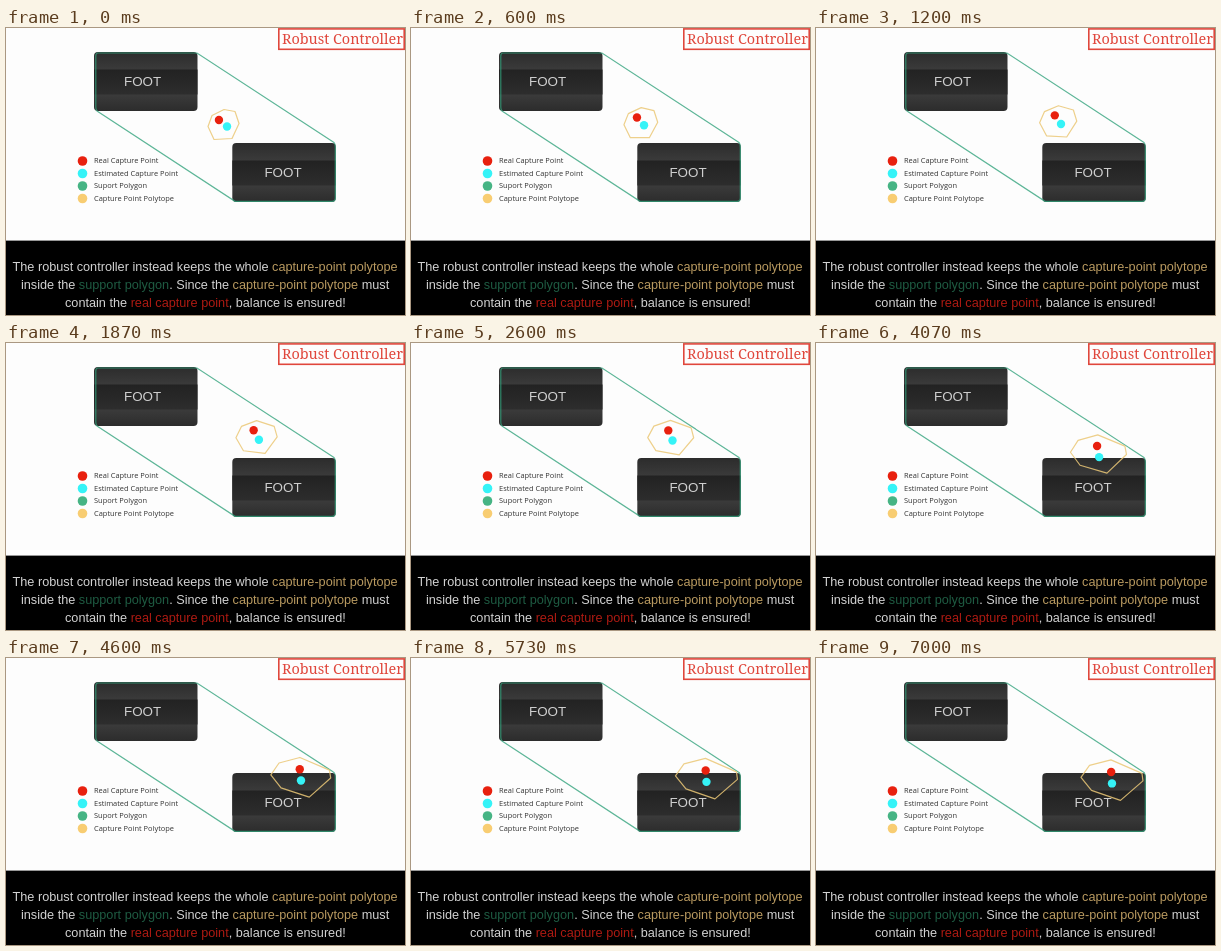
An HTML page that plays this animation: 399 by 287 pixels, repeating every 7070 ms.

```html
<!DOCTYPE html>
<html lang="en">
<head>
<meta charset="utf-8">
<title>Robust Controller</title>
<style>
  html, body { margin: 0; width: 100%; height: 100%; overflow: hidden; background: #fdfdfd; }
  svg { display: block; width: 100vw; height: 100vh; }
  .title { font: 500 14.4px "Noto Serif", serif; fill: #e0473c; }
  .foot { font: 13.4px "Liberation Sans", Arial, sans-serif; fill: #cfcfcf; }
  .legend { font: 7.45px "Open Sans", sans-serif; fill: #333; }
  .caption { font: 12.7px "Liberation Sans", Arial, sans-serif; fill: #d2d2d2; }
  .title, .foot, .caption { text-anchor: middle; }
  .tan { fill: #b99a60; }
  .green { fill: #1e5b42; }
  .red { fill: #ad1a12; }
</style>
</head>
<body>
<svg viewBox="0 0 399 287" preserveAspectRatio="none">
  <defs>
    <linearGradient id="edge" x2="0" y2="1">
      <stop offset="0" stop-color="#2c2c2c"/>
      <stop offset=".29" stop-color="#3a3a3a"/>
      <stop offset=".7" stop-color="#3c3c3c"/>
      <stop offset="1" stop-color="#2c2c2c"/>
    </linearGradient>
    <linearGradient id="band" x2="0" y2="1">
      <stop offset="0" stop-color="#222"/>
      <stop offset="1" stop-color="#2d2d2d"/>
    </linearGradient>
    <g id="shoe">
      <rect width="103.5" height="59" rx="4" fill="url(#edge)"/>
      <rect y="17.5" width="103.5" height="25" fill="url(#band)"/>
    </g>
  </defs>

  <rect width="399" height="287" fill="#fdfdfd"/>
  <rect x="272.8" y=".9" width="125.4" height="20.4" fill="none" stroke="#e0473c" stroke-width="1.6"/>
  <text class="title" x="336.5" y="16">Robust Controller</text>

  <use href="#shoe" x="88" y="24"/>
  <use href="#shoe" x="226.3" y="115"/>
  <path d="M92 25H191L328 114.4Q329.3 115.5 329.3 119V170Q329.3 173.3 326 173.3H229L91 83Q89.8 82 89.8 79V28Q89.8 25 92 25Z"
        fill="none" stroke="#31a27b" stroke-opacity=".78" stroke-width="1.2"/>
  <text class="foot" x="136.6" y="57.8">FOOT</text>
  <text class="foot" x="277" y="148.8">FOOT</text>
  <g id="legend" class="legend"></g>

  <path id="polytope" fill="none" stroke="#ebc877" stroke-opacity=".85" stroke-width="1.2" stroke-linejoin="round"/>
  <circle id="real" r="4.2" fill="#e8200e"/>
  <circle id="estimate" r="4.2" fill="#35f3f7"/>

  <rect y="212.6" width="399" height="75" fill="#000"/>
  <g class="caption">
    <text x="199.1" y="243">The robust controller instead keeps the whole <tspan class="tan">capture-point polytope</tspan></text>
    <text x="199.1" y="261.3">inside the <tspan class="green">support polygon</tspan>. Since the <tspan class="tan">capture-point polytope</tspan> must</text>
    <text x="199.4" y="279.3">contain the <tspan class="red">real capture point</tspan>, balance is ensured!</text>
  </g>
</svg>
<script>
const LOOP = 7070;
const SETTLE = 4900;
const $ = id => document.getElementById(id);
const mix = (a, b, u) => a + (b - a) * u;

$("legend").innerHTML = [
  ["#e8200e", "Real Capture Point"],
  ["#35f3f7", "Estimated Capture Point"],
  ["#46b484", "Suport Polygon"],
  ["#f8cd72", "Capture Point Polytope"]
].map(([color, label], i) => {
  const y = 133 + i * 12.5;
  return `<circle cx="76.5" cy="${y}" r="4.8" fill="${color}"/><text x="88" y="${y + 2.4}">${label}</text>`;
}).join("");

// Way points of the estimate: time, x, y.
const route = [
  [0, 221, 98.5], [1200, 245, 96], [2600, 261.5, 97.5],
  [3530, 271, 105.5], [4600, 295, 122.5], [LOOP, 296, 125.5]
];

// Polytope corners around the estimate, before and after it grows.
const small = [[-19, 0], [-15, -11], [-3, -17], [8, -15], [12, -3], [5, 12], [-13, 13]];
const large = [[-31, -6], [-22.5, -18], [-1, -23.5], [30, -10], [31, -2.5], [8.5, 17], [-20.5, 7]];

function estimateAt(t) {
  const next = route.findIndex(point => point[0] > t);
  const [t0, x0, y0] = route[next - 1];
  const [t1, x1, y1] = route[next];
  const u = (t - t0) / (t1 - t0);
  return [mix(x0, x1, u), mix(y0, y1, u)];
}

function place(dot, x, y) {
  dot.setAttribute("cx", x);
  dot.setAttribute("cy", y);
}

function draw(t) {
  const [x, y] = estimateAt(t);
  const progress = Math.min(1, t / SETTLE);
  const growth = progress ** 1.15;

  // The real point swings from the upper left to right above the estimate.
  const lean = mix(0.89, 0.07, progress ** 0.8);
  const reach = 10.4 + progress;
  place($("estimate"), x, y);
  place($("real"), x - reach * Math.sin(lean), y - reach * Math.cos(lean));

  const corners = small.map(([sx, sy], i) => {
    const [lx, ly] = large[i];
    return [x + mix(sx, lx, growth), y + mix(sy, ly, growth)];
  });
  $("polytope").setAttribute("d", `M${corners.join(" ")}Z`);
}

const start = performance.now();
function tick() {
  draw((performance.now() - start) % LOOP);
  requestAnimationFrame(tick);
}
tick();
</script>
</body>
</html>
```
